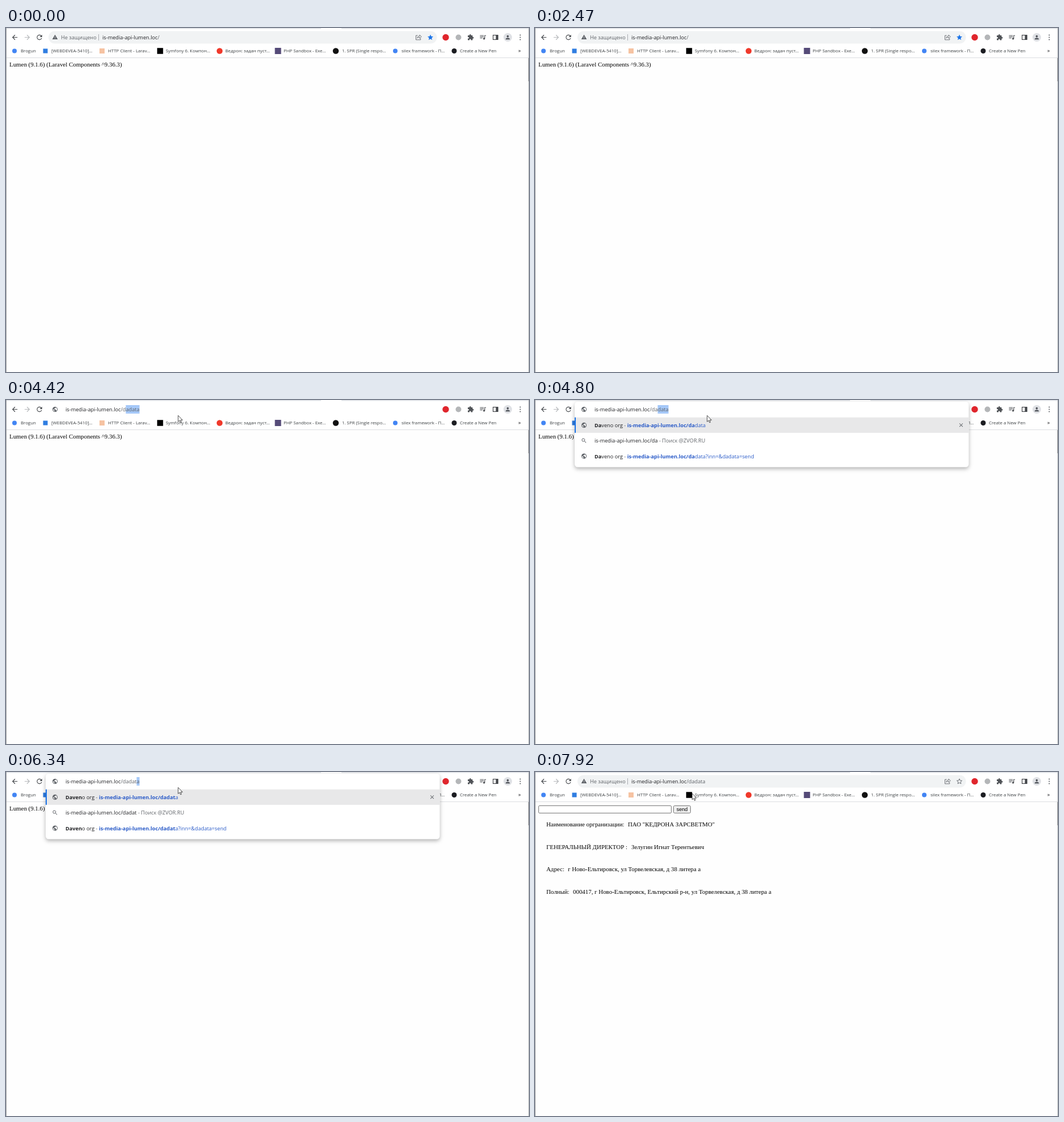
Animation, 923 px wide and 607 px high, one loop 7990 ms. Source, as an HTML page:

```html
<!DOCTYPE html>
<html lang="ru">
<head>
<meta charset="utf-8">
<title>Browser</title>
<style>
  html, body { margin: 0; width: 100%; height: 100%; overflow: hidden; background: #fefefe; }
  svg { display: block; width: 100vw; height: 100vh; }
  text { white-space: pre; font: 9.2px "Open Sans", "Noto Sans", sans-serif; fill: #202124; }
  .mark { font-size: 7.85px; fill: #3c4043; }
  .page text { font: 10.9px "Liberation Serif", serif; fill: #000; }
  .page .btn { font: 9.1px "Liberation Sans", sans-serif; }
  .soft { fill: #5f6368; }
  .link { fill: #2a5bc8; }
  .b { font-weight: 700; }
  .panel { filter: drop-shadow(0 3px 3.5px rgba(0, 0, 0, .3)); }
</style>
</head>
<body>
<svg id="stage" viewBox="0 0 923 607"></svg>
<script>
const LOOP = 7990;
const HOST = 'is-media-api-lumen.loc';
const WORD = 'dadata';
const TITLE = 'Daveno';
const GREY = '#5f6368';

const ICON = {
  back: 'M20 11H7.83l5.59-5.59L12 4l-8 8 8 8 1.41-1.41L7.83 13H20z',
  reload: 'M17.65 6.35A8 8 0 1 0 19.73 14h-2.08A6 6 0 1 1 12 6c1.66 0 3.14.69 4.22 1.78L13 11h7V4z',
  close: 'M19 6.41 17.59 5 12 10.59 6.41 5 5 6.41 10.59 12 5 17.59 6.41 19 12 13.41 17.59 19 19 17.59 13.41 12z',
  warn: 'M1 21h22L12 2zm12-3h-2v-2h2zm0-4h-2v-4h2z',
  info: 'M11 7h2v2h-2zm0 4h2v6h-2zm1-9a10 10 0 1 0 0 20 10 10 0 0 0 0-20zm0 18a8 8 0 1 1 0-16 8 8 0 0 1 0 16z',
  globe: 'M12 2a10 10 0 1 0 0 20 10 10 0 0 0 0-20zm-1 17.93A8 8 0 0 1 4.21 10.2L9 15v1a2 2 0 0 0 2 2zm6.9-2.54A2 2 0 0 0 16 16h-1v-3a1 1 0 0 0-1-1H8v-2h2a1 1 0 0 0 1-1V7h2a2 2 0 0 0 2-2v-.41a8 8 0 0 1 2.9 12.8z',
  search: 'M15.5 14h-.79l-.28-.27a6.5 6.5 0 1 0-.7.7l.27.28v.79l5 4.99L20.49 19zm-6 0a4.5 4.5 0 1 1 0-9 4.5 4.5 0 0 1 0 9z',
  star: 'M12 17.27 18.18 21l-1.64-7.03L22 9.24l-7.19-.61L12 2 9.19 8.63 2 9.24l5.46 4.73L5.82 21z',
  puzzle: 'M20.5 11H19V7c0-1.1-.9-2-2-2h-4V3.5a2.5 2.5 0 0 0-5 0V5H4c-1.1 0-2 .9-2 2v3.8h1.5a2.7 2.7 0 0 1 0 5.4H2V20c0 1.1.9 2 2 2h3.8v-1.5a2.7 2.7 0 0 1 5.4 0V22H17c1.1 0 2-.9 2-2v-4h1.5a2.5 2.5 0 0 0 0-5z',
  queue: 'M15 6H3v2h12zm0 4H3v2h12zM3 16h8v-2H3zM17 6v8.18a3 3 0 1 0 2 2.82V8h3V6z',
  person: 'M12 12a4 4 0 1 0 0-8 4 4 0 0 0 0 8zm0 2c-2.67 0-8 1.34-8 4v2h16v-2c0-2.66-5.33-4-8-4z'
};

const icon = (name, x, y, size, fill = GREY, more = '') =>
  `<path d="${ICON[name]}" transform="translate(${x - size / 2} ${y - size / 2}) scale(${size / 24})" fill="${fill}" ${more}/>`;
const rect = (x, y, w, h, fill, more = '') =>
  `<rect x="${x}" y="${y}" width="${w}" height="${h}" fill="${fill}" ${more}/>`;
const disc = (x, y, r, fill) => `<circle cx="${x}" cy="${y}" r="${r}" fill="${fill}"/>`;
const text = (x, y, body, cls = '') => `<text x="${x}" y="${y}" class="${cls}">${body}</text>`;
const span = (body, cls) => `<tspan class="${cls}">${body}</tspan>`;
const group = (id, body, cls = '') => `<g id="${id}" class="${cls}">${body}</g>`;

// text x, label, badge x, badge size, badge colour, round
const bookmarks = [
  [26, 'Brogun', 15, 8, '#4285f4', 1],
  [80, '[WEBDEVEA-5410]...', 69.5, 8, '#2f7de1', 0],
  [180, 'HTTP Client - Larav...', 169.5, 9, '#f6c3a2', 0],
  [282, 'Symfony 6. Компон...', 272, 10.5, '#000', 0],
  [387, 'Ведрон: задан пуст...', 377, 10.5, '#f0392b', 1],
  [490, 'PHP Sandbox - Exe...', 480, 11, '#554b78', 0],
  [593, '1. SPR (Single respo...', 582, 10.5, '#111', 1],
  [698, 'silex framework - П...', 687, 8, '#4285f4', 1],
  [801, 'Create a New Pen', 791, 9, '#1c1d22', 1]
];
const badge = (x, size, fill, round) => round
  ? disc(x, 40.5, size / 2, fill)
  : rect(x - size / 2, 40.5 - size / 2, size, size, fill);

const facts = [
  ['Наименование оргранизации:', 164, 'ПАО "КЕДРОНА ЗАРСВЕТМО"'],
  ['ГЕНЕРАЛЬНЫЙ ДИРЕКТОР :', 170, 'Зелугин Игнат Терентьевич'],
  ['Адрес:', 58, 'г Ново-Ельтировск, ул Торвелевская, д 38 литера а'],
  ['Полный:', 67, '000417, г Ново-Ельтировск, Ельтирский р-н, ул Торвелевская, д 38 литера а']
];

const frame = rect(0, 0, 923, 53, '#fff') + rect(0, 0, 923, 1.5, '#dee1e6') +
  rect(556, 0, 36, 2, '#fff') + rect(0, 52, 923, 1, '#dcdee1') +
  rect(0, 0, 1, 607, '#a0a2a5') + rect(922, 0, 1, 607, '#b4b6b9') + rect(922, 53, 1, 41, '#6a6c70');

const toolbar =
  icon('back', 15.5, 16.5, 14, '#45484c') +
  `<g transform="rotate(180 37.5 16.5)">${icon('back', 37.5, 16.5, 14, '#b7b9bc')}</g>` +
  group('reload', icon('reload', 59, 16.5, 14, '#45484c')) +
  group('stop', icon('close', 59, 16.5, 14.5, '#45484c')) +
  disc(776, 16.5, 5.7, '#e0262d') + disc(798.5, 16.5, 5, '#b4b6b8') +
  icon('puzzle', 820, 16.5, 12, '#505357') + icon('queue', 841.5, 16, 13.5, '#505357') +
  '<rect x="859.6" y="12.6" width="8.4" height="7.8" fill="none" stroke="#45484c" stroke-width="1.2"/>' +
  rect(864.5, 12.5, 4, 8, '#45484c') +
  disc(885.5, 16.5, 7.5, '#dfe1e5') + icon('person', 885.5, 16.5, 11, '#50545a') +
  [12.6, 16.5, 20.4].map(y => disc(907.5, y, 1, '#50545a')).join('');

const marks = bookmarks.map(([x, label, bx, size, fill, round]) =>
  badge(bx, size, fill, round) + text(x, 43.2, label, 'mark')).join('') +
  text(904, 43.4, '»');

const form = rect(6.5, 59.5, 234, 13, '#fff', 'stroke="#767676" rx="1.4"') +
  rect(244.5, 59.5, 30, 13, '#efefef', 'stroke="#767676" rx="2"') +
  '<text x="259.5" y="69" class="btn" text-anchor="middle">send</text>' +
  facts.map(([label, x, value], i) =>
    text(20, 96 + i * 39.65, label) + text(x, 96 + i * 39.65, value)).join('');

const actions =
  '<path d="M726.5 13.2h-3v7.6h8.2v-2.4M725.8 18c.3-2.6 2-3.8 4.2-3.8v-2l3.2 3.2-3.2 3v-2c-1.8 0-3.2.4-4.2 1.6z" fill="none" stroke="#5f6368" stroke-width=".9"/>' +
  group('starOn', icon('star', 749, 16.5, 12, '#1a73e8')) +
  group('starOff', icon('star', 749, 16.5, 11, 'none', `stroke="${GREY}" stroke-width="2"`));

document.getElementById('stage').innerHTML =
  rect(0, 0, 923, 607, '#fefefe') + frame +
  group('home', text(6, 68.4, 'Lumen (9.1.6) (Laravel Components ^9.36.3)'), 'page') +
  group('result', form, 'page') + toolbar + marks + group('popup', '') +
  rect(75, 5.5, 685.5, 22, '#f1f3f4', 'rx="11" id="pill"') +
  '<rect id="ring" x="74.2" y="4.9" width="687" height="23.2" rx="11.6" fill="#fff" stroke="#1a73e8" stroke-width="1.4"/>' +
  group('warn', icon('warn', 86.5, 16, 10.5) + text(97, 19.8, 'Не защищено', 'soft') + rect(163, 11, 1, 11, '#a9acb0')) +
  group('info', icon('info', 86.5, 16.5, 11)) + group('globe', icon('globe', 86.5, 16.5, 11)) +
  group('actions', actions) +
  rect(0, 9, 0, 15, '#a5c8f8', 'id="sel"') + '<text id="url" y="19.8"></text>' +
  rect(0, 10.5, .8, 11.5, '#000', 'id="caret"') +
  '<circle id="glow" r="8.2" fill="#f3ec4f" opacity=".85"/>' +
  '<path id="arrow" d="M.3.3V11.3L2.8 9 4.5 12.9 6.2 12.1 4.6 8.4H8z" fill="#fff" stroke="#111" stroke-width=".75"/>' +
  '<path id="beam" d="M-2-5.5h1.4l.6.6.6-.6H2M0-5V5M-2 5.5h1.4l.6-.6.6.6H2" fill="none" stroke="#222" stroke-width=".9"/>';

const el = id => document.getElementById(id);
const show = (id, on) => el(id).setAttribute('visibility', on ? 'visible' : 'hidden');
const place = (id, x, y) => el(id).setAttribute('transform', `translate(${x} ${y})`);

// time, letters typed, inline completion, suggestion rows
const typing = [
  [3500, 0, false, 0], [4420, 1, true, 0], [4490, 1, true, 3], [4800, 2, true, 3],
  [5120, 2, false, 4], [5810, 3, true, 3], [6040, 4, true, 3], [6340, 5, true, 3],
  [6430, 6, false, 3]
];
const FOCUS = 3500, DESELECT = 3790, ENTER = 6810, FADED = 6900, PAGE = 7140, DONE = 7220;

// pointer stops: time, x, y
const stops = [
  [360, 818, 570], [980, 572, 387], [1060, 572, 387], [1460, 377, 154.5], [1840, 262, -16],
  [2690, 262, -14], [3090, 279, 14], [3190, 279, 14], [3410, 283, 18], [3790, 283, 18],
  [4020, 298, 17], [4100, 300, 18], [4170, 303.5, 27], [7840, 303.5, 27], [7920, 277, 37.5], [LOOP, 277, 37.5]
];

function pointer(t) {
  const i = stops.findIndex(s => s[0] > t);
  if (i < 1) return null;
  const [a, ax, ay] = stops[i - 1], [b, bx, by] = stops[i];
  const n = Math.max(1, Math.round((b - a) / 78));
  const p = Math.floor((t - a) / (b - a) * n + 1e-6) / n;
  return [ax + (bx - ax) * p, ay + (by - ay) * p];
}

function suggestion(n, query) {
  return span(TITLE.slice(0, n), 'b') + TITLE.slice(n) + ' org' + span(' - ', 'soft') +
    span(`${HOST}/${WORD.slice(0, n)}`, 'b link') + span(WORD.slice(n) + query, 'link');
}

function panel(n, rows) {
  if (!rows) return '';
  const typed = `${HOST}/${WORD.slice(0, n)}`;
  const page = ['globe', suggestion(n, '')];
  const list = [
    rows === 4 ? ['globe', span(typed, 'b link')] : page,
    ['search', typed + span(' - Поиск @ZVOR.RU', 'soft')],
    ...(rows === 4 ? [page] : []),
    ['globe', suggestion(n, '?inn=&amp;dadata=send')]
  ];
  const bottom = 36.4 + rows * 27.4;
  return rect(70, 3, 695.5, bottom - 3, '#fff', 'rx="5.5" class="panel"') +
    rect(70, 30.7, 695.5, 27.2, '#e8e8e9') + rect(70, 30.7, 2, 27.2, '#1a73e8') +
    (rows === 3 ? icon('close', 752, 44.3, 11) : '') +
    list.map(([name, body], i) =>
      icon(name, 86.5, 44.4 + i * 27.35, 11) + text(105, 47.8 + i * 27.35, body)).join('');
}

let drawn = '';
function drawAddress(t) {
  const focused = t >= FOCUS && t < ENTER;
  const key = typing.findLast(k => t >= k[0]);
  const [, n, complete, rows] = key || [0, 0, false, 0];
  const allSelected = focused && t < DESELECT;
  const state = [focused, n, complete, rows, allSelected, t >= ENTER, t >= FADED, t >= DONE].join();
  if (state === drawn) return;
  drawn = state;

  const x = focused ? 105 : t >= ENTER && t < DONE ? 97 : 170;
  const url = el('url');
  const write = path => {
    url.innerHTML = HOST + span('/' + path, 'soft');
    return url.getComputedTextLength();
  };
  url.setAttribute('x', x);
  const typedWidth = write(WORD.slice(0, n));
  const fullWidth = complete ? write(WORD) : typedWidth;
  const from = allSelected ? 0 : typedWidth;
  el('sel').setAttribute('x', x + from);
  el('sel').setAttribute('width', focused ? fullWidth - from : 0);
  el('caret').setAttribute('x', x + typedWidth + .3);
  show('caret', focused && !complete && !allSelected);
  el('popup').innerHTML = t < FADED ? panel(n, rows) : '';
}

function render(t) {
  const focused = t >= FOCUS && t < ENTER;
  const loading = t >= ENTER && t < DONE;
  drawAddress(t);

  el('popup').setAttribute('opacity', t < ENTER ? 1 : .4);
  show('home', t < PAGE);
  show('result', t >= PAGE);
  show('reload', !loading);
  show('stop', loading);
  show('pill', !focused);
  show('ring', focused && t < 4420);
  show('globe', focused);
  show('info', loading);
  show('warn', !focused && !loading);
  show('actions', !focused);
  // The nested stars follow the hidden state of the action icons.
  show('starOn', t < FOCUS);
  show('starOff', t >= ENTER);

  const at = pointer(t);
  const overBar = !!at && t < 4170 && at[1] > 5 && at[1] < 28;
  el('pill').setAttribute('fill', overBar ? '#eef0f2' : '#f1f3f4');
  show('arrow', at && !overBar);
  show('beam', overBar);
  show('glow', t >= 3330 && t < 3490 || t >= 3640 && t < 3780);
  if (at) ['arrow', 'beam', 'glow'].forEach(id => place(id, ...at));
}

const start = performance.now();
function tick(now) {
  render(Math.max(0, now - start) % LOOP);
  requestAnimationFrame(tick);
}
render(0);
requestAnimationFrame(tick);
</script>
</body>
</html>
```
